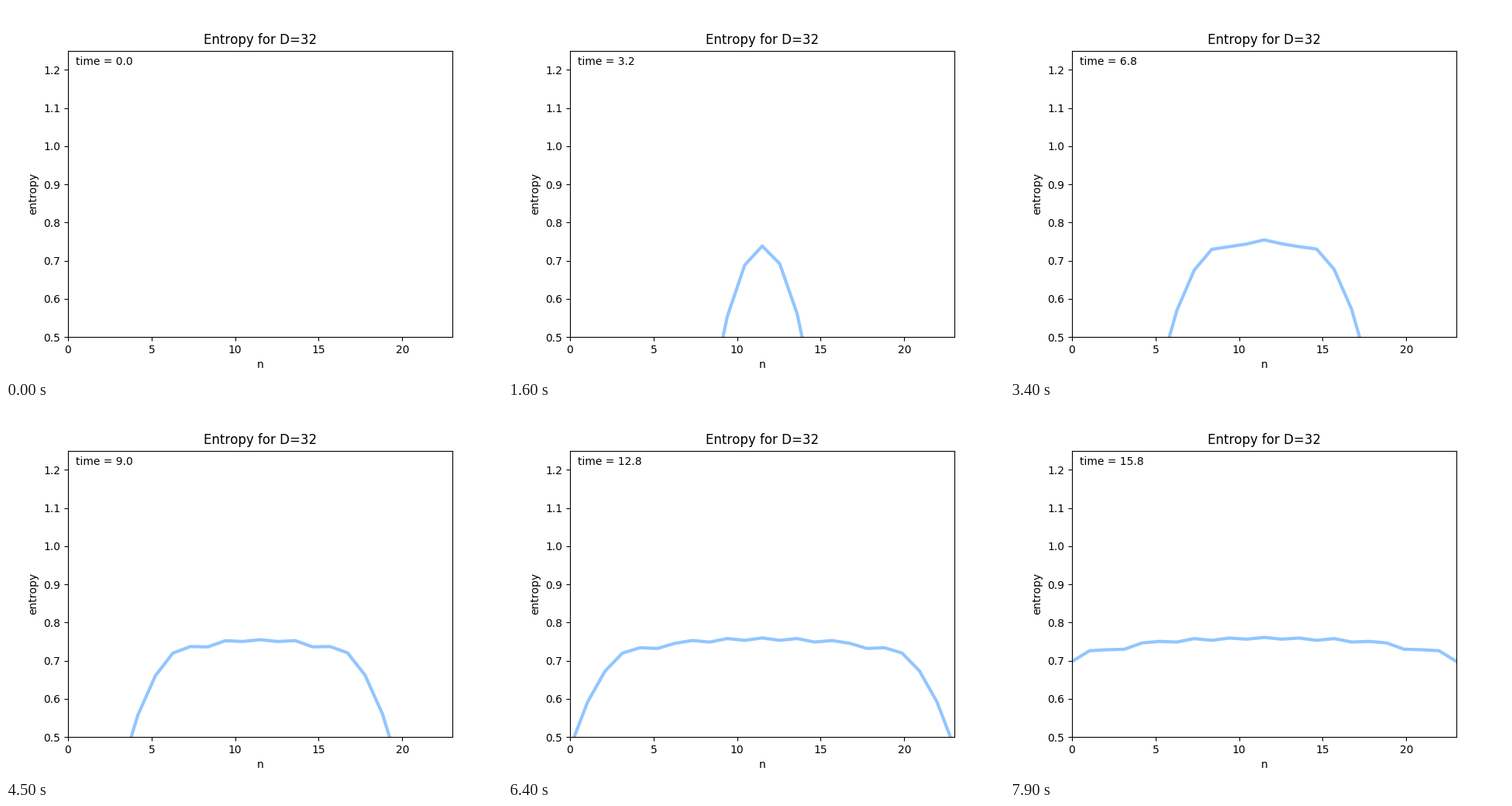
A matplotlib script that plays this animation: 640x480 px, repeating every 8000 ms.

```python
import numpy as np
import matplotlib.pyplot as plt
from matplotlib.animation import FuncAnimation

FRAMES = 80
INTERVAL = 100
DT = 0.2
SITES = 23

plt.rcParams["text.kerning_factor"] = 6

x = np.linspace(0, 23, SITES)
offset = np.arange(SITES) - SITES // 2


def front(s):
    """Entropy at scaled distance s behind the front: rise plus fading ripples."""
    depth = np.maximum(s, 0)
    rise = 0.3725 * (1 + np.tanh(0.40 + 0.385 * s))
    phase = 2 * np.pi * (depth ** 1.7 / 17.8 - 0.43)
    ripple = 0.0176 * np.exp(-depth / 5.5) * np.cos(phase)
    return rise + 0.0011 * s + ripple


def entropy(t):
    """Light-cone front that broadens as t^(1/3)."""
    delay = 0.6 + 1.129 * np.abs(offset)
    skew = 0.035 * np.sign(offset) * np.exp(-t / 8)
    s = (t - delay + skew) / np.cbrt(max(t, DT) / 10)
    sag = 2.4e-6 * t ** 3 * np.exp(-((s - 4.5) / 2.5) ** 2)
    return front(s) - sag


fig, ax = plt.subplots(figsize=(6.4, 4.8), dpi=100)
ax.set(xlim=(0, 23), ylim=(0.5, 1.25), xlabel="n", ylabel="entropy",
       title="Entropy for D=32")
line, = ax.plot([], [], color="#92C6FF", lw=3)
label = ax.text(0.02, 0.95, "", transform=ax.transAxes)


def update(i):
    t = i * DT
    line.set_data(x, entropy(t))
    label.set_text(f"time = {t:.1f}")
    return line, label


anim = FuncAnimation(fig, update, frames=FRAMES, interval=INTERVAL,
                     repeat=True, repeat_delay=0)
plt.show()
```
